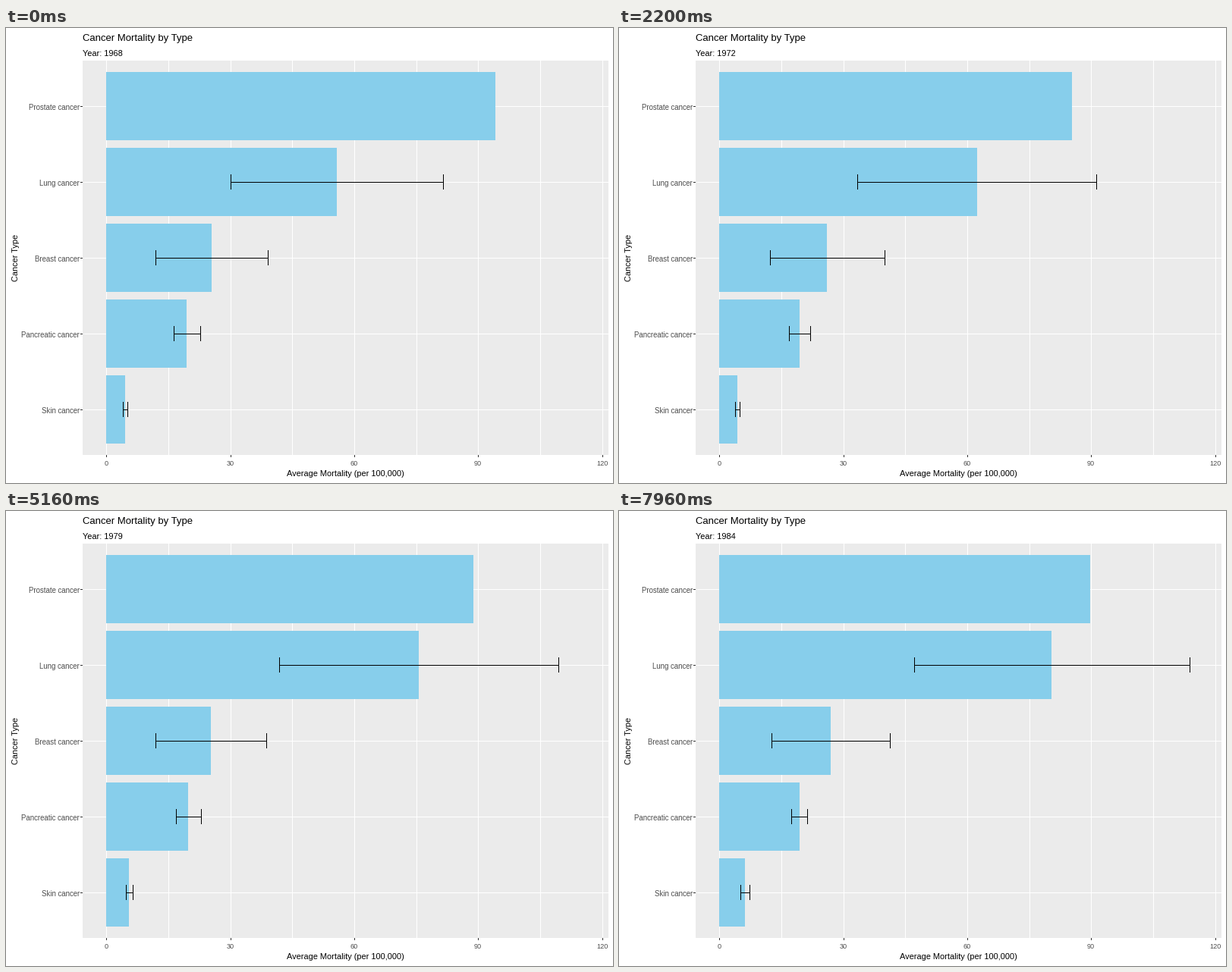
These frames come from a looping animation (800x600 px, 8000 ms). A matplotlib script:

```python
import numpy as np
import matplotlib.pyplot as plt
from matplotlib.animation import FuncAnimation
from matplotlib.patches import Rectangle

plt.rcParams["font.family"] = "Liberation Sans"

W, H, DPI = 800, 600, 100
ZERO, UNIT = 132, 5.45            # x of rate 0, pixels per unit of rate
CYCLE, HOLD, MOVE = 12, 3, 8      # frames per year, still frames, moving frames
FRAMES, INTERVAL = 200, 40

NAMES = ["Prostate", "Lung", "Breast", "Pancreatic", "Skin"]
ROWS = [103 + 100 * i for i in range(5)]

FIRST_YEAR = 1968
YEARS = FIRST_YEAR + np.arange(FRAMES // CYCLE + 2)
TURNS = [1968, 1971, 1972.5, 1976, 1979, 1982.5, 1985]
THIRDS = [1968, 1976, 1985]


def trend(rates, years=TURNS):
    """Yearly rates on straight lines between a few turning points."""
    return np.interp(YEARS, years, rates)


prostate = trend([94.1, 88, 96, 85.8, 85.4, 84.5, 88.9, 90.7, 89.5],
                 [1968, 1969, 1970] + TURNS[1:])
lung = trend([55.8, 60.1, 62.1, 70.2, 75.7, 79.8, 80.6])
breast = trend([25.5, 27, 25.9, 26.5, 25.3, 26.4, 27.1])
pancreas = trend([19.5, 19.6, 19.3, 21, 19.85, 18.6, 19.55])
skin = trend([4.6, 4.8, 4.3, 5.25, 5.6, 5.95, 6.3])

MEANS = UNIT * np.array([prostate, lung, breast, pancreas, skin])
ERRORS = UNIT * np.array([
    0 * prostate,
    lung * trend([0.46, 0.466, 0.41], THIRDS),
    breast * 0.53,
    trend([3.2, 2.55, 3.02, 2.75, 1.85], [1968, 1972.5, 1979, 1982, 1985]),
    trend([0.55, 0.55, 1.15], THIRDS),
])

fig = plt.figure(figsize=(W / DPI, H / DPI), dpi=DPI, facecolor="white")
ax = fig.add_axes([0, 0, 1, 1])
ax.set(xlim=(0, W), ylim=(H, 0))
ax.axis("off")


def box(x, y, w, h, color, z=1):
    patch = Rectangle((x, y), w, h, facecolor=color, linewidth=0,
                      antialiased=False, zorder=z)
    return ax.add_patch(patch)


def label(x, y, text, px, color="black", ha="left", **kw):
    return ax.text(x, y, text, fontsize=px * 72 / DPI, color=color, ha=ha,
                   va="baseline", **kw)


# Panel, grid and axes
box(101, 43, 693, 520, "#EBEBEB")
for y, name in zip(ROWS, NAMES):
    box(101, y, 693, 1, "white", 2)
    box(98, y, 3, 1, "#333333")
    label(97, y + 5, name + " cancer", 9.6, "#4D4D4D", "right")
for rate in range(0, 121, 15):
    x = round(ZERO + UNIT * rate)
    box(x, 43, 1, 520, "white", 2)
    if rate % 30 == 0:
        box(x, 563, 1, 3, "#333333")
        label(x, 577, str(rate), 9.2, "#4D4D4D", "center")

label(101, 17, "Cancer Mortality by Type", 13.1)
label(447, 591, "Average Mortality (per 100,000)", 11, ha="center")
label(15.5, 302.5, "Cancer Type", 11, ha="center", rotation=90,
      rotation_mode="anchor")
year_text = label(101, 37, "", 11)

# Moving parts
bars = [box(ZERO, y - 45, 1, 90, "#87CEEB", 3) for y in ROWS]
whiskers = [[box(0, y, 1, 1, "black", 4),
             box(0, y - 10, 1, 20, "black", 4),
             box(0, y - 10, 1, 20, "black", 4)] for y in ROWS[1:]]


def ease(t):
    """Cubic in and out."""
    return 4 * t ** 3 if t < 0.5 else 1 - 4 * (1 - t) ** 3


def blend(table, year, k):
    return table[:, year] * (1 - k) + table[:, year + 1] * k


def draw(frame):
    year, step = divmod(frame, CYCLE)
    t = min(max((step - HOLD) / MOVE, 0), 1)
    means = blend(MEANS, year, ease(t))
    errors = blend(ERRORS, year, ease(t))

    for bar, mean in zip(bars, means):
        bar.set_width(round(mean))
    for (line, left, right), mean, err in zip(whiskers, means[1:], errors[1:]):
        lo, hi = ZERO + round(mean - err), ZERO + round(mean + err)
        line.set_x(lo)
        line.set_width(hi - lo)
        left.set_x(lo)
        right.set_x(hi)
    year_text.set_text(f"Year: {FIRST_YEAR + year + (t > 0.5)}")
    return [*bars, *sum(whiskers, []), year_text]


anim = FuncAnimation(fig, draw, frames=FRAMES, interval=INTERVAL,
                     repeat=True, repeat_delay=0, blit=False)
plt.show()
```
